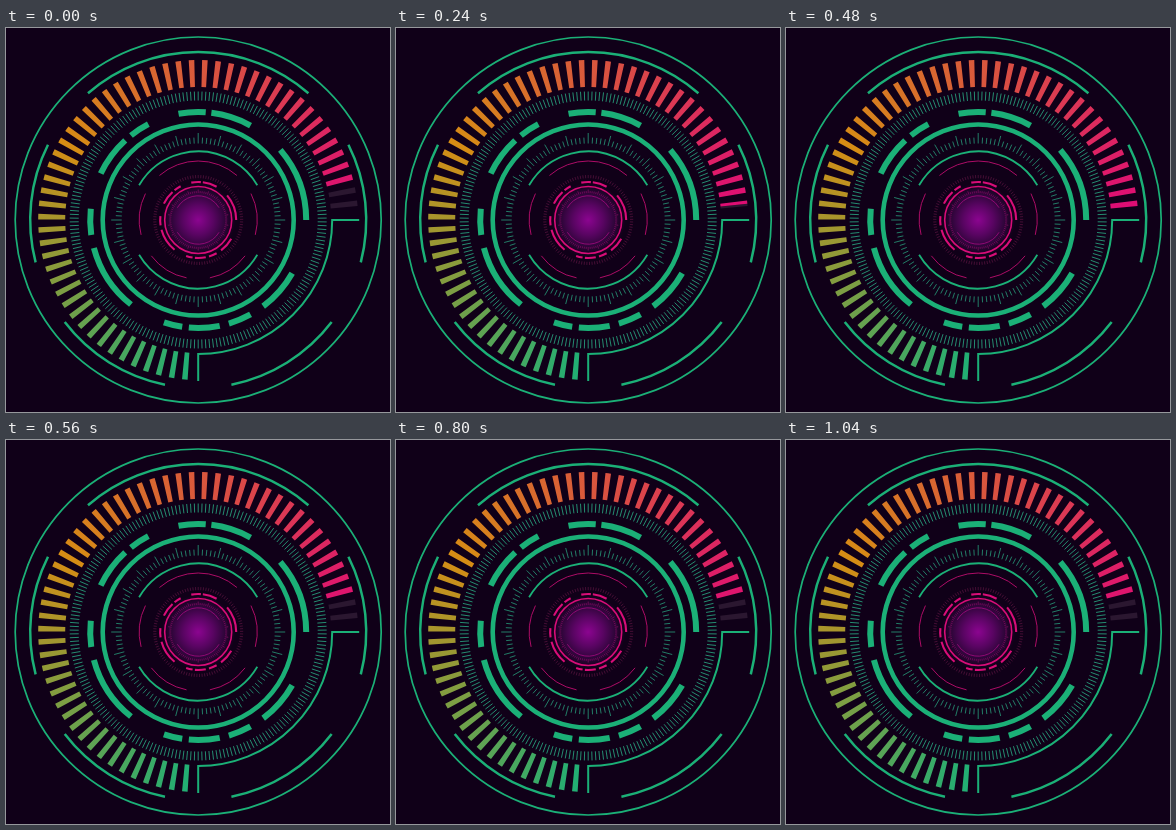
These frames come from a looping animation (384x384 px, 1.12 s). An HTML page with a canvas:

```html
<!DOCTYPE html>
<html lang="en">
<head>
<meta charset="utf-8">
<title>HUD dial</title>
<style>
html, body { margin: 0; width: 100%; height: 100%; overflow: hidden; background: #100018; }
canvas { display: block; width: 384px; height: 384px; }
</style>
</head>
<body>
<canvas id="dial" width="384" height="384"></canvas>
<script>
const ctx = document.getElementById('dial').getContext('2d');
const LOOP = 1120, STEP = 80;
const BACK = '#100018', GREEN = '#1bb077', TEAL = '#258c70', PINK = '#d80d78', DIM = '#2b1730';

// Angles are degrees clockwise from the top.
const rad = deg => (deg - 90) * Math.PI / 180;

function arc(r, from, to, width, color) {
  ctx.beginPath();
  ctx.arc(0, 0, r, rad(from), rad(to));
  ctx.lineWidth = width;
  ctx.strokeStyle = color;
  ctx.stroke();
}

const ring = (r, width, color) => arc(r, 0, 360, width, color);

// Arc given by its middle and half its sweep
const bow = (r, mid, half, width, color) => arc(r, mid - half, mid + half, width, color);

function ticks(count, width, color, r0, r1, long = r1) {
  ctx.beginPath();
  for (let i = 0; i < count; i++) {
    const a = rad(i * 360 / count), end = i % 5 ? r1 : long;
    ctx.moveTo(r0 * Math.cos(a), r0 * Math.sin(a));
    ctx.lineTo(end * Math.cos(a), end * Math.sin(a));
  }
  ctx.lineWidth = width;
  ctx.strokeStyle = color;
  ctx.stroke();
}

function rim(r, width, color) {
  bow(r, 0, 41, width, color);
  for (const side of [-1, 1]) {
    bow(r, side * 84, 20.6, width, color);
    bow(r, side * 148, 20.6, width, color);
  }
}

function caps(r, width, color) {
  bow(r, 0, 59.5, width, color);
  bow(r, 180, 59.5, width, color);
}

function dashes(r, width, color) {
  const pair = (start, first, gap, second) => {
    arc(r, start, start + first, width, color);
    arc(r, start + first + gap, start + first + gap + second, width, color);
  };
  pair(-64.5, 22, 4, 11);
  pair(-10.5, 14.5, 3, 22);
  arc(r, 49.5, 90, width, color);
  pair(119.5, 23.5, 8, 12.5);
  pair(168.5, 16.5, 3.5, 10);
  pair(218.5, 36.5, 7, 14);
}

const heat = ctx.createConicGradient(Math.PI / 2, 0, 0);
heat.addColorStop(0, GREEN);
heat.addColorStop(1 / 3, '#d68d14');
heat.addColorStop(3 / 4, '#df0878');

function gauge(edge) {
  for (let i = 0; i < 55; i++) {
    const from = -176.2 + i * 4.8, to = from + 2;
    const lit = Math.max(from, Math.min(to, edge));
    if (lit < to) arc(146.5, lit, to, 27, DIM);
    if (lit > from) arc(146.5, from, lit, 27, heat);
  }
}

function bracket() {
  ctx.beginPath();
  ctx.moveTo(161, 0);
  ctx.lineTo(134, 0);
  ctx.arc(0, 0, 134, 0, Math.PI / 2);
  ctx.lineTo(0, 161);
  ctx.lineWidth = 2;
  ctx.strokeStyle = GREEN;
  ctx.stroke();
}

function outer(edge) {
  ring(183, 1.7, GREEN);
  rim(168, 2.5, GREEN);
  gauge(edge);
  bracket();
  ticks(210, 1, TEAL, 119.5, 128.5);
  dashes(108, 6, GREEN);
  ring(95.5, 4.6, GREEN);
  ticks(120, 0.9, TEAL, 76.5, 82.5, 87);
  caps(68.6, 1.8, GREEN);
}

const glow = ctx.createRadialGradient(0, 0, 0, 0, 0, 37);
glow.addColorStop(0, '#8b0590');
glow.addColorStop(0.4, '#5a0563');
glow.addColorStop(0.75, '#2a0535');
glow.addColorStop(1, BACK);

function core() {
  ctx.fillStyle = glow;
  ctx.beginPath();
  ctx.arc(0, 0, 37, 0, 2 * Math.PI);
  ctx.fill();

  rim(59, 1, '#ad0c66');
  ticks(105, 0.9, '#4b1038', 41.8, 45);
  dashes(38, 2.1, PINK);
  ring(33.5, 1.6, PINK);
  ticks(90, 0.6, '#9b0b70', 27, 29, 30.5);
  caps(24.2, 0.8, '#a50b80');
}

// The gauge climbs, overshoots downwards, then settles: [ms, angle]
const KEYS = [[0, 77], [160, 83.8], [480, 85.2], [640, 69.8], [800, 77], [LOOP, 77]];

function edgeAt(ms) {
  const i = KEYS.findIndex(([t]) => t > ms);
  const [t0, a0] = KEYS[i - 1], [t1, a1] = KEYS[i];
  return a0 + (a1 - a0) * (ms - t0) / (t1 - t0);
}

function draw(ms) {
  const held = Math.floor(ms % LOOP / STEP) * STEP;
  ctx.setTransform(1, 0, 0, 1, 0, 0);
  ctx.fillStyle = BACK;
  ctx.fillRect(0, 0, 384, 384);
  ctx.translate(192.2, 192);
  outer(edgeAt(held));
  core();
}

const start = performance.now();
function tick() {
  draw(performance.now() - start);
  requestAnimationFrame(tick);
}
tick();
</script>
</body>
</html>
```
